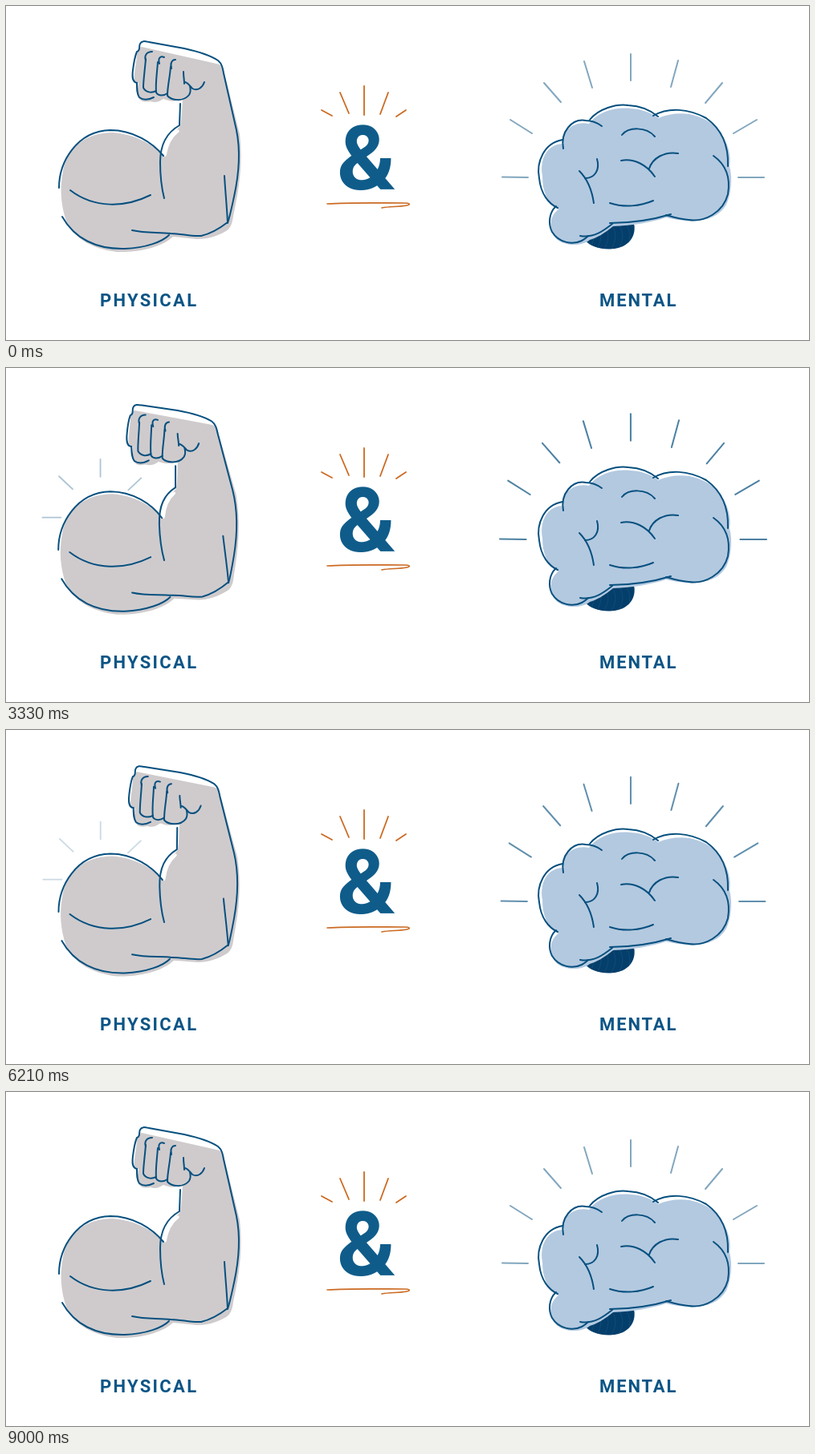
Write an HTML page with a canvas that moves like this. It is 1000x417 px and loops after 9.03 s.

```html
<!DOCTYPE html>
<html lang="en">
<head>
<meta charset="utf-8">
<title>Physical & Mental</title>
<style>
  html, body { margin: 0; width: 100%; height: 100%; overflow: hidden; background: #fff; }
  canvas { display: block; width: 1000px; height: 417px; }
</style>
</head>
<body>
<canvas id="stage" width="1000" height="417"></canvas>
<script>
const ctx = document.getElementById('stage').getContext('2d');
const LOOP = 9030, CYCLE = 3000, STEP = 30;
const NAVY = '#07507f', GREY = '#cfcbcd', SKY = '#b3c9e0', ORANGE = '#cb6a22';

const armFill = `M169 51 L262 72 C268 73 271 77 272 84 L291 160 C295 195 291 225 283 262
  C282 272 279 278 274 281 C262 288 250 291 238 291 L208 288 C192 303 160 308 138 307
  C105 303 80 288 73 262 C67 240 68 222 71 206 C76 178 98 158 133 158 C160 160 182 172 196 187
  C200 173 206 160 217 150 C219 140 219 128 220 116 C208 121 202 118 196 116
  C190 120 186 121 180 119 C170 121 166 118 164 112 C163 108 164 102 165 96
  C160 95 159 92 160 84 L163 62 C163 56 165 52 169 51 Z`;
const armLines = [
  // hand and outer forearm
  `M163 96 C157 95 157 88 158 80 C159 72 160 64 163 57 C168 56 165 50 167 47
   C169 43 173 44 178 45 L222 53 C240 57 255 62 264 68 C269 72 270 78 271 84 L287 155
   C293 185 289 215 284 238 C281 252 279 262 276 271`,
  'M163 96 C163 104 163 110 166 114 C171 118 178 117 184 114',
  'M174 68 C172 62 175 57 182 57', 'M191 72 C189 65 192 62 197 64', 'M206 78 C204 71 207 67 211 67',
  'M174 66 C173 80 171 92 171 102 C174 108 181 109 187 106',
  'M189 70 C188 85 186 96 187 108 C190 113 197 112 201 109',
  'M205 76 C204 90 201 100 201 112 C206 118 221 120 228 111 C230 108 230 104 229 100',
  'M221 82 C221 88 222 92 222 97', 'M223 95 C227 96 229 100 232 103 C239 107 245 101 247 95',
  // upper arm
  'M66 227 C66 195 88 156 130 155 C158 155 182 170 196 187',
  'M70 263 C85 290 112 304 148 303 C175 302 195 294 203 286',
  'M80 230 C110 253 148 252 180 236',
  'M157 280 C175 284 190 282 205 284 C218 284 230 288 243 287 C256 284 267 277 276 270 C275 250 273 230 272 212',
  'M217 122 L216 149 C200 158 192 172 192 195 C192 212 194 228 197 240'
];
const armShine = 'M214 156 C205 163 200 173 198 186';

// Each ray: x1 y1 x2 y2, then its drift over a full flex
const armRays = [
  [48, 187, 71, 187, -12, -2], [68, 137, 85, 153, -9, -8],
  [118, 116, 118, 138, -2, -10], [167, 140, 151, 155, 6, -12]
];

const brainFill = `M668 212 C664 190 675 172 694 172 C692 155 708 143 726 147
  C738 131 760 126 778 128 C795 129 806 135 812 140 C835 130 862 133 880 148
  C896 162 904 182 901 200 C905 215 903 235 897 248 C885 268 860 273 822 264
  C805 270 780 274 756 275 C745 284 735 290 727 292 C715 302 690 299 683 288
  C676 276 677 262 688 254 C674 246 668 232 668 212 Z`;
const brainLines = [
  'M693 167 C670 171 660 195 664 215 C666 235 676 247 687 252',
  'M694 178 C690 157 705 140 722 143 C731 143 738 147 742 150',
  'M727 142 C738 128 760 122 775 124 C795 125 805 132 812 138',
  'M806 137 C825 126 850 128 872 140 C893 155 900 175 899 200',
  'M881 187 C895 197 903 212 899 235 C893 258 870 270 850 267 C838 266 829 263 822 261',
  'M828 260 C805 267 780 271 752 271',
  'M685 250 C676 258 675 272 680 282 C688 295 705 299 717 293 C721 291 723 289 725 287',
  'M715 287 C732 290 745 280 755 272',
  'M767 161 C775 151 797 150 808 163', 'M766 193 C782 190 798 198 808 213',
  'M801 203 C805 190 820 181 837 184', 'M736 191 C740 205 733 215 721 215',
  'M714 206 C724 216 730 232 732 246', 'M752 246 C770 252 790 250 806 243'
];
const stem = 'M722 293 C730 285 745 280 754 272 L782 272 C785 285 778 300 758 303 C742 305 727 300 722 293 Z';
const brainRays = [
  [618, 213.5, 650, 214], [628, 142, 655, 159], [670, 96, 691, 120], [720, 69, 730, 102],
  [778, 60, 778, 93], [837, 68, 828, 101], [892, 96, 871, 121], [935, 142, 906, 159], [944, 214, 912, 214]
];
const sparks = [
  [393, 130, 406, 137], [416, 108, 427, 134], [446, 100, 446, 136], [476, 108, 466, 135], [498, 130, 486, 138]
];

// Time and value pairs
const tilt = [[0, 0], [500, 0], [1050, 2.6], [1150, 2.6], [1800, -4.2], [2500, 0], [3000, 0]];
const spread = [[0, 1], [900, 1.06], [1110, 1.022], [1500, 1], [1800, 1.007], [2100, 1.06], [3000, 1]];

const clamp = v => Math.max(0, Math.min(1, v));
function smooth(a, b, v) {
  const k = clamp((v - a) / (b - a));
  return k * k * (3 - 2 * k);
}
function keyed(keys, t) {
  const i = Math.max(1, keys.findIndex(k => k[0] >= t));
  const [t0, a] = keys[i - 1], [t1, b] = keys[i];
  return a + (b - a) * smooth(t0, t1, t);
}

// Swings the forearm about the elbow while the biceps swells
function flex(x, y, u) {
  const w = y < 125 ? 1 : smooth(170, 215, x);
  const elbow = smooth(150, 260, y);
  const dx = w * (0.1625 * (y - 287) + 7.5 * elbow) + (1 - w) * 0.044 * (x - 150);
  const dy = w * (-0.1625 * (x - 222) - 3.75 * elbow) + (1 - w) * 0.044 * (y - 235);
  return [x + dx * u, y + dy * u];
}

function bend(path, u) {
  return new Path2D(path.replace(/(-?[\d.]+)\s+(-?[\d.]+)/g,
    (_, x, y) => flex(+x, +y, u).map(v => v.toFixed(2)).join(' ')));
}

function stroke(path, color, width) {
  ctx.strokeStyle = color;
  ctx.lineWidth = width;
  ctx.stroke(path);
}

function fill(path, color) {
  ctx.fillStyle = color;
  ctx.fill(path);
}

function ray([x1, y1, x2, y2], color, width) {
  stroke(new Path2D(`M${x1} ${y1} L${x2} ${y2}`), color, width);
}

function drawArm(u) {
  fill(bend(armFill, u), GREY);
  stroke(bend(armShine, u), '#fff', 3.5);
  armLines.forEach(p => stroke(bend(p, u), NAVY, 2));
  ctx.globalAlpha = clamp(u * 1.5);
  for (const [x1, y1, x2, y2, dx, dy] of armRays) {
    ray([x1 + dx * u, y1 + dy * u, x2 + dx * u, y2 + dy * u], NAVY, 1.8);
  }
  ctx.globalAlpha = 1;
}

function drawBrain(t) {
  ctx.save();
  ctx.translate(781, 214.5);
  ctx.rotate(keyed(tilt, t) * Math.PI / 180);
  ctx.translate(-781, -214.5);

  const stemPath = new Path2D(stem);
  fill(stemPath, '#043e6b');
  ctx.save();
  ctx.clip(stemPath);
  for (let i = 0; i < 7; i++) {
    const x = 728 + i * 9;
    stroke(new Path2D(`M${x} 274 C${x + 6} 284 ${x + 5} 294 ${x - 2} 304`), '#164f7c', 0.8);
  }
  ctx.restore();

  fill(new Path2D(brainFill), SKY);
  brainLines.forEach(p => stroke(new Path2D(p), NAVY, 2));

  const s = keyed(spread, t);
  ctx.globalAlpha = 0.5 + 0.5 * clamp(Math.min(t, CYCLE - t) / 750);
  ctx.translate(781, 214);
  ctx.scale(s, s);
  ctx.translate(-781, -214);
  brainRays.forEach(r => ray(r, NAVY, 2));
  ctx.restore();
}

function label(text, x, y, font, spacing) {
  ctx.font = font;
  ctx.letterSpacing = spacing;
  ctx.fillText(text, x, y);
}

function drawCenter() {
  ctx.fillStyle = '#0f5c8a';
  label('&', 412, 229, '700 112px Roboto, sans-serif', '0px');
  ctx.fillStyle = '#0b5586';
  label('PHYSICAL', 117, 374.5, '700 22px Roboto, sans-serif', '2.3px');
  label('MENTAL', 739, 374.5, '700 22px Roboto, sans-serif', '1.9px');
  sparks.forEach(r => ray(r, ORANGE, 1.8));
  stroke(new Path2D('M400 247 C430 245 470 246 496 246 C503 246 504 248 499 249 C488 251 478 250 468 252'), ORANGE, 1.7);
}

function draw(now) {
  const frame = Math.floor((now % LOOP) / STEP) * STEP;
  const t = frame % CYCLE;
  const u = 1 - Math.abs(t / 1500 - 1);
  ctx.clearRect(0, 0, 1000, 417);
  ctx.lineCap = ctx.lineJoin = 'round';
  drawArm(u);
  drawBrain(t);
  drawCenter();
}

const start = performance.now();
function tick() {
  draw(performance.now() - start);
  requestAnimationFrame(tick);
}
tick();
</script>
</body>
</html>
```
